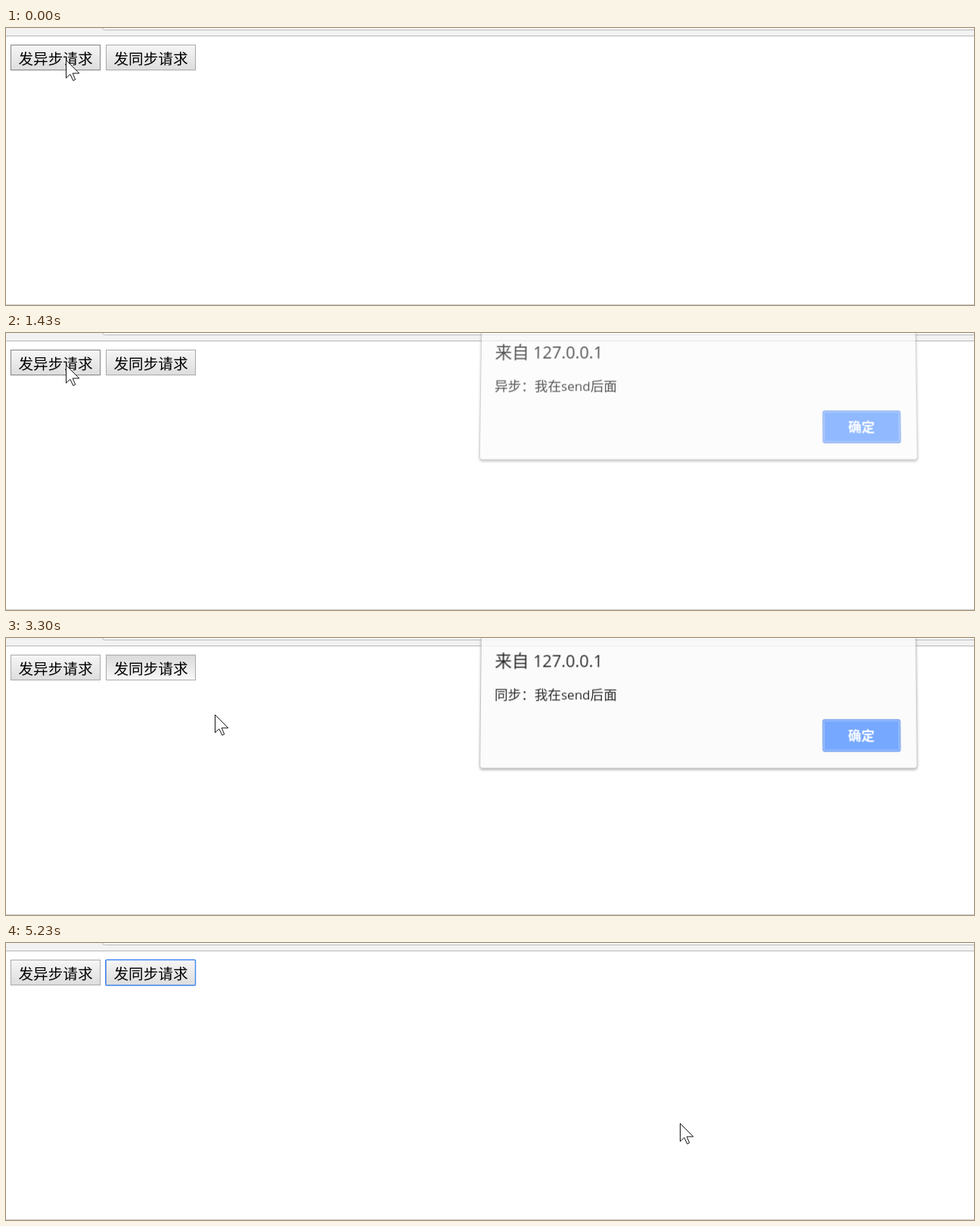
These frames come from a looping animation (1280x366 px, 5690 ms). An HTML page:

```html
<!DOCTYPE html>
<html lang="zh-CN">
<head>
<meta charset="utf-8">
<title>异步与同步请求</title>
<style>
  html, body { margin: 0; width: 100%; height: 100%; overflow: hidden; background: #fff; }
  #stage { position: relative; width: 100%; height: 100%; overflow: hidden; contain: strict; }
  svg { position: absolute; left: 0; top: 0; width: 1280px; height: 366px; }
  text { font-family: "Noto Sans CJK SC", "Noto Sans CJK", "Noto Sans CJK JP", sans-serif; fill: #000; }
  .en { font-family: "Open Sans", "Noto Sans", sans-serif; font-size: .97em; }
  .label { font-size: 19.6px; text-anchor: middle; }
  #dialog { left: 616px; width: 600px; height: 190px; transform-origin: 300px 94px; }
  #panel { filter: drop-shadow(0 2px 1.5px rgba(0, 0, 0, .32)); }
</style>
</head>
<body>
<div id="stage">
  <svg viewBox="0 0 1280 366">
    <defs>
      <linearGradient id="up" x2="0" y2="1">
        <stop offset="0" stop-color="#f6f6f6"/><stop offset="1" stop-color="#dddddd"/>
      </linearGradient>
      <linearGradient id="down" x2="0" y2="1">
        <stop offset="0" stop-color="#dadada"/><stop offset="1" stop-color="#f8f8f8"/>
      </linearGradient>
    </defs>
    <rect width="1280" height="10" fill="#f2f2f2"/>
    <path d="M0 10.5H1280" stroke="#b8b8b8"/>
    <path d="M127.5 -2V-.5Q127.5 2.5 130.5 2.5H1282V-2Z" fill="#fff" stroke="#b8b8b8"/>
    <path d="M0 365.5H1280" stroke="#cdcdcd"/>
    <rect id="async" x="6.5" y="22.5" width="118" height="33"/>
    <rect id="sync" x="132.5" y="22.5" width="118" height="33"/>
    <rect id="ring" x="131.75" y="22.25" width="118.75" height="33.75" rx="1.5" fill="none" stroke="#4a8cf5" stroke-width="1.5"/>
    <text class="label" x="65.5" y="47.6">发异步请求</text>
    <text class="label" x="191.5" y="47.6">发同步请求</text>
  </svg>
  <svg id="dialog" viewBox="616 0 600 190">
    <rect id="panel" x="627.5" y="6.5" width="576.5" height="175" rx="3.5" fill="#fafafa" stroke="#b9b9b9"/>
    <text x="646" y="48.5" font-size="22.5">来自<tspan class="en"> 127.0.0.1</tspan></text>
    <text x="646" y="91.5" font-size="17.6"><tspan id="kind">异步</tspan>：我在<tspan class="en">send</tspan>后面</text>
    <rect x="1080" y="117.5" width="102" height="42" rx="2" fill="#5996ff" stroke="#4a82dc"/>
    <rect x="1081.5" y="119" width="99" height="39" rx="1" fill="none" stroke="#a0c2ff"/>
    <text x="1130.7" y="145.4" font-size="17.5" font-weight="700" text-anchor="middle" style="fill:#fff">确定</text>
  </svg>
  <svg viewBox="0 0 1280 366">
    <path id="cursor" d="M0 0V23.6L5.3 18.6L9.3 27L12.2 25.6L8.7 17.4H17.3Z" fill="#fff" stroke="#111" stroke-linejoin="round"/>
  </svg>
</div>
<script>
const LOOP = 5690, STEP = 75;
const $ = id => document.getElementById(id);

// Pointer moves: start in ms, number of steps, end point
const home = [79, 42];
const moves = [
  [1590, 5, 196, 49],
  [2510, 3, 240, 78],
  [2980, 2, 276, 101],
  [3920, 6, 893, 258],
  [4380, 5, 891, 238]
];

// Dialogs: opening and closing time in ms, first word
const dialogs = [
  [570, 1355, "异步"],
  [3210, 3840, "同步"]
];

// Progress 0..1, advancing once per STEP
function steps(t, start, count) {
  const done = Math.floor((t - start) / STEP) + 1;
  return Math.min(1, Math.max(0, done / count));
}

const smooth = p => p * p * (3 - 2 * p);

function paintButton(id, hover, down) {
  $(id).setAttribute("fill", down ? "url(#down)" : "url(#up)");
  $(id).setAttribute("stroke", hover && !down ? "#838383" : "#a9a9a9");
}

function drawCursor(t) {
  let [x, y] = home;
  for (const [start, count, toX, toY] of moves) {
    const p = smooth(steps(t, start, count));
    x += (toX - x) * p;
    y += (toY - y) * p;
  }
  $("cursor").setAttribute("transform", `translate(${Math.round(x) + .5} ${Math.round(y) + .5})`);
}

function drawDialog(t) {
  const [open, close, word] = dialogs[t < 2500 ? 0 : 1];
  const away = 1 - steps(t, open, 3) + steps(t, close, 4);
  const style = $("dialog").style;
  style.opacity = 1 - away ** 1.6;
  style.transform = away
    ? `perspective(750px) translateY(${-29 * away}px) rotateX(${4.4 * away}deg)`
    : "none";
  $("kind").textContent = word;
}

function draw(t) {
  paintButton("async", t < 1740, t >= 420 && t < 1355);
  paintButton("sync", t >= 1740 && t < 2130, t >= 2130 && t < 3840);
  $("ring").style.display = t >= 5230 ? "" : "none";
  drawDialog(t);
  drawCursor(t);
}

const start = performance.now();
function tick() {
  draw((performance.now() - start) % LOOP);
  requestAnimationFrame(tick);
}
tick();
</script>
</body>
</html>
```
